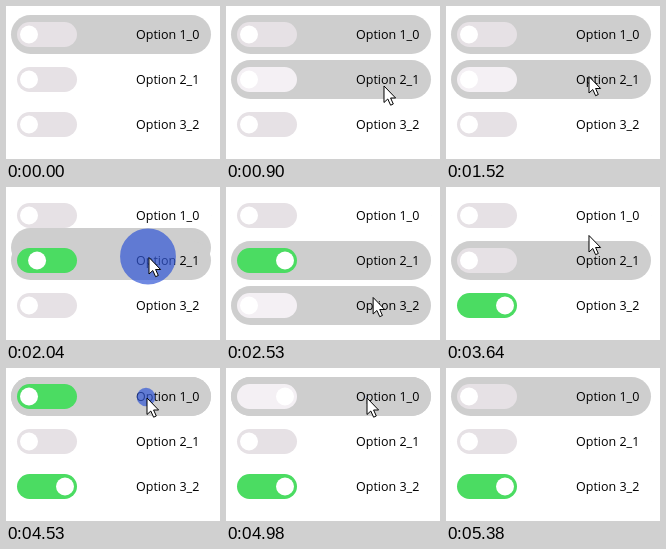
An HTML page for the animation above (5770 ms loop, 214x153 px).

```html
<!DOCTYPE html>
<html lang="en">
<head>
<meta charset="utf-8">
<title>Toggle options</title>
<style>
  html, body { margin: 0; width: 100%; height: 100%; overflow: hidden; background: #fff; }
  svg { display: block; width: 100%; height: 100%; }
  text { font: 12.5px "Open Sans", "Noto Sans", sans-serif; fill: #000; }
  .pill { fill: #cecece; }
  .knob { fill: #fff; }
</style>
</head>
<body>
<svg id="stage" viewBox="0 0 214 153">
  <g id="pills"></g>
  <g id="options"></g>
  <circle id="ripple" fill="none"/>
  <path id="cursor" d="M0 0V16.5L3.8 13L6.6 19.2L9.3 18L6.6 12H11.6Z"
        fill="#fff" stroke="#000" stroke-linejoin="round"/>
</svg>
<script>
const LOOP = 5770;
const ROW_TOP = 9, ROW_STEP = 45, ROW_HEIGHT = 39;
const KNOB_OFF = 23, KNOB_TRAVEL = 36;
const OFF = '#e6e1e5', OFF_HOVER = '#f4f0f4', ON = '#4bdc62';

// slide: duration of the selection pill's move to the clicked row
const clicks = [
  { at: 1980, row: 1, slide: 300 },
  { at: 2780, row: 2, slide: 300 },
  { at: 3330, row: 1, slide: 300 },
  { at: 4515, row: 0, slide: 0 },
  { at: 4980, row: 0, slide: 0 },
];

// time, x, y of the pointer tip
const pointerPath = [
  [120, 176, 90], [510, 158, 80], [900, 158, 80], [1420, 143, 70.5],
  [2300, 143, 70.5], [2580, 147.5, 114], [3010, 147.5, 114], [3300, 143, 70.5],
  [3480, 143, 70.5], [3640, 143, 48.5], [3810, 141, 30],
  [5100, 141, 30], [5380, 150, 156],
];

const byId = id => document.getElementById(id);
const clamp = v => Math.min(1, Math.max(0, v));
const mix = (a, b, k) => a + (b - a) * k;
const smooth = k => k * k * (3 - 2 * k);
const outQuad = k => 1 - (1 - k) ** 2;
const outBack = k => 1 + 2.7 * (k - 1) ** 3 + 1.7 * (k - 1) ** 2;
const rowY = row => ROW_TOP + row * ROW_STEP;

function add(parent, tag, attrs, text = '') {
  const el = document.createElementNS('http://www.w3.org/2000/svg', tag);
  set(el, attrs);
  el.textContent = text;
  return parent.appendChild(el);
}

function set(el, attrs) {
  for (const name in attrs) el.setAttribute(name, attrs[name]);
}

const addPill = () => add(byId('pills'), 'rect',
  { class: 'pill', x: 5, width: 200, height: ROW_HEIGHT, rx: ROW_HEIGHT / 2 });
const selectedPill = addPill();
const hoverPill = addPill();
const ripple = byId('ripple'), cursor = byId('cursor');

const options = [0, 1, 2].map(row => {
  const g = add(byId('options'), 'g', { transform: `translate(0 ${rowY(row)})` });
  const track = add(g, 'rect', { x: 11, y: 7, width: 60, height: 25, rx: 12.5 });
  const knob = add(g, 'circle', { class: 'knob', cy: 19.5, r: 9 });
  add(g, 'text', { x: 130, y: 24 }, `Option ${row + 1}_${row}`);
  return { track, knob };
});

function pointerAt(t) {
  const next = pointerPath.findIndex(p => p[0] > t);
  if (next < 1) return null;
  const [t0, x0, y0] = pointerPath[next - 1];
  const [t1, x1, y1] = pointerPath[next];
  const k = smooth((t - t0) / (t1 - t0));
  return { x: mix(x0, x1, k), y: mix(y0, y1, k) };
}

function hoveredRow(pointer) {
  return pointer
    ? [0, 1, 2].findIndex(r => pointer.y >= rowY(r) && pointer.y < rowY(r) + ROW_HEIGHT)
    : -1;
}

function drawOption(row, t, hovered) {
  const past = clicks.filter(c => c.row === row && c.at <= t);
  const on = past.length % 2 === 1;
  const moved = past.length ? smooth(clamp((t - past.at(-1).at - 15) / 150)) : 1;
  const position = on ? moved : 1 - moved;
  const { track, knob } = options[row];
  set(track, { fill: on ? ON : hovered ? OFF_HOVER : OFF });
  set(knob, { cx: KNOB_OFF + KNOB_TRAVEL * position });
}

function drawSelection(past, t) {
  const last = past.at(-1);
  if (!last) return set(selectedPill, { y: rowY(0) });
  const from = past.length > 1 ? past.at(-2).row : 0;
  const k = last.slide ? outBack(clamp((t - last.at) / last.slide)) : 1;
  set(selectedPill, { y: mix(rowY(from), rowY(last.row), k) });
}

// A disc grows to full size, then a hole opens until nothing is left.
function drawRipple(click, t) {
  const age = click ? t - click.at : Infinity;
  const visible = age < 190;
  set(ripple, { visibility: visible ? 'visible' : 'hidden' });
  if (!visible) return;
  const outer = 30 * Math.sin(clamp(age / 80) * Math.PI / 2);
  const hole = outQuad(clamp((age - 70) / 120));
  const inner = outer * hole;
  const { x, y } = pointerAt(click.at);
  const tint = clamp(hole * 1.5);
  const rgb = [mix(51, 85, tint), mix(88, 126, tint), mix(214, 244, tint)].map(Math.round);
  set(ripple, {
    cx: x - 1, cy: y - 1,
    r: (outer + inner) / 2,
    'stroke-width': outer - inner,
    stroke: `rgba(${rgb}, .7)`,
  });
}

function draw(t) {
  const pointer = pointerAt(t);
  const hover = hoveredRow(pointer);
  const past = clicks.filter(c => c.at <= t);
  drawSelection(past, t);
  drawRipple(past.at(-1), t);
  options.forEach((_, row) => drawOption(row, t, row === hover));
  set(hoverPill, { y: rowY(Math.max(0, hover)), visibility: hover < 0 ? 'hidden' : 'visible' });
  set(cursor, { visibility: pointer ? 'visible' : 'hidden' });
  if (pointer) set(cursor, { transform: `translate(${pointer.x} ${pointer.y})` });
}

const start = performance.now();
function tick() {
  draw((performance.now() - start) % LOOP);
  requestAnimationFrame(tick);
}
tick();
</script>
</body>
</html>
```
